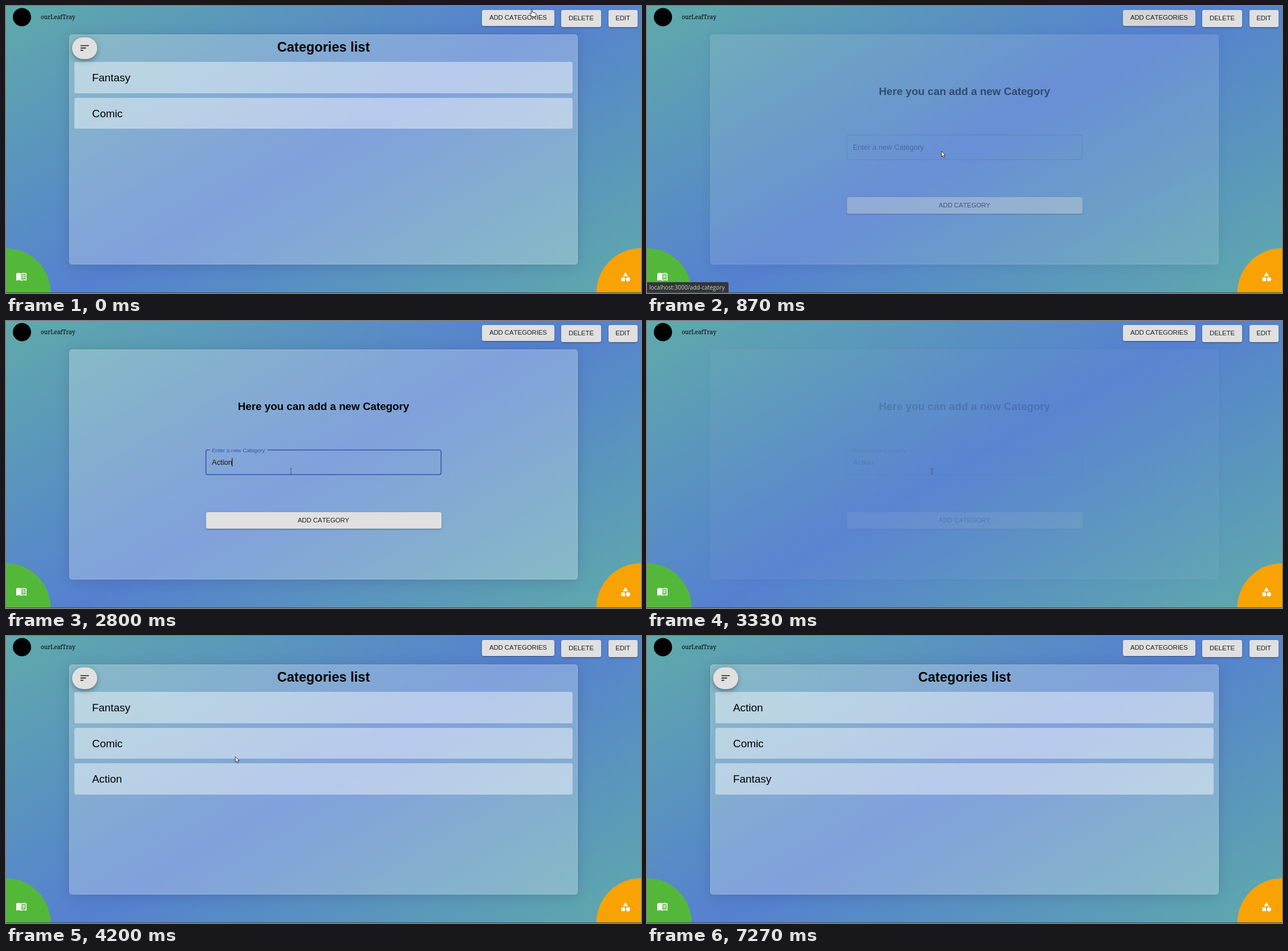
These frames come from a looping animation (1114x503 px, 7390 ms). An HTML page:

```html
<!DOCTYPE html>
<html lang="en">
<head>
<meta charset="utf-8">
<title>Categories</title>
<style>
html, body { margin: 0; width: 100%; height: 100%; overflow: hidden; }
#stage {
  position: relative; width: 1114px; height: 503px; overflow: hidden;
  background: linear-gradient(150deg, #5faaaa, #5580d0 50%, #5faaaa);
  font-family: "Liberation Sans", Arial, sans-serif;
}
#stage div, svg { position: absolute; box-sizing: border-box; }
svg { left: 0; top: 0; width: 1114px; height: 503px; }
text { font-kerning: none; white-space: pre; }
.screen { left: 0; top: 0; width: 1114px; height: 503px; }
.panel {
  left: 111px; top: 50px; width: 892px; height: 403px; border-radius: 5px;
  background: rgba(255,255,255,.26); border: 1px solid rgba(255,255,255,.18);
  box-shadow: 0 3px 24px rgba(0,0,0,.12);
}
.row { left: 120px; width: 874px; height: 54.5px; border-radius: 3.3px; background: rgba(255,255,255,.43); }
.btn {
  border-radius: 3.3px; background: #e0e0e0;
  box-shadow: 0 2.4px .8px -1.6px rgba(0,0,0,.2), 0 1.6px 1.6px rgba(0,0,0,.14), 0 .8px 4px rgba(0,0,0,.12);
}
.head { top: 6.5px; height: 30px; }
#sort {
  left: 116px; top: 55px; width: 44px; height: 37.5px; border-radius: 19px;
  box-shadow: 0 2.4px 4px -.8px rgba(0,0,0,.2), 0 5px 8px rgba(0,0,0,.14), 0 .8px 14px rgba(0,0,0,.12);
}
.caps { font-size: 11.42px; letter-spacing: -.08px; fill: rgba(0,0,0,.87); text-anchor: middle; }
.title { font-weight: bold; text-anchor: middle; }
.item { font-size: 18.9px; }
.field { font-size: 13.05px; letter-spacing: -.07px; }
#tip { left: 125px; top: 103px; width: 26px; height: 17px; border-radius: 3.3px; background: rgba(97,97,97,.9); }
#tip span { display: block; font: 500 8.15px/17px Roboto, sans-serif; color: #fff; text-align: center; }
#status {
  left: 0; top: 484px; width: 143px; height: 19px; background: #343639; border-radius: 0 3px 0 0;
  font: 10px/19px "Open Sans", sans-serif; color: #c9cbcd; padding-left: 4px; white-space: nowrap;
}
</style>
</head>
<body>
<div id="stage">
  <div class="btn head" id="add" style="left:835px;width:127px;height:28.5px"></div>
  <div class="btn head" style="left:974px;width:70px"></div>
  <div class="btn head" style="left:1056.5px;width:51.5px"></div>
  <svg>
    <circle cy="503" r="78.4" fill="#53b83a"/>
    <circle cx="1114" cy="503" r="78.4" fill="#f9a203"/>
    <circle cx="28" cy="19.5" r="16"/>
    <text x="61" y="22.5" font-size="10.1" font-family="Noto Serif, serif">ourLeafTray</text>
    <text class="caps" x="898.4" y="24.4">ADD CATEGORIES</text>
    <text class="caps" x="1009" y="25">DELETE</text>
    <text class="caps" x="1082" y="25">EDIT</text>
    <g transform="translate(17.2 464.2) scale(.8155)" fill="#fff">
      <path fill-rule="evenodd" d="M12 6C10.5 4.9 8.5 4.5 6.5 4.5S2.5 4.9 1 6v15.2C2.5 20.4 4.6 20 6.5 20s4 .4 5.5 1.5C13.5 20.5 15.8 20 17.5 20s3.8.4 5.5 1.2V6c-1.6-1.1-3.5-1.5-5.5-1.5S13.5 4.9 12 6zm9 12.5c-3-.9-6.5-.6-9 1V8c2.5-1.6 6-1.9 9-1z"/>
      <path d="M13.5 10.3q3-1.2 6-.6M13.5 13q3-1.2 6-.6M13.5 15.7q3-1.2 6-.6" fill="none" stroke="#fff" stroke-width="1.5"/>
    </g>
    <g transform="translate(1077 464.7) scale(.8155)" fill="#fff">
      <path d="M12 2l-5.5 9h11zM3 13.5h8v8H3z"/>
      <circle cx="17.5" cy="17.5" r="4.5"/>
    </g>
  </svg>

  <div class="screen" id="list">
    <div class="panel"></div>
    <div class="row" style="top:98px"></div>
    <div class="row" style="top:160.7px"></div>
    <div class="row" id="third" style="top:223.3px"></div>
    <div id="sort"></div>
    <svg>
      <path transform="translate(128.2 63.8) scale(.8155)" d="M3 18h6v-2H3zM3 6v2h18V6zM3 13h12v-2H3z" fill-opacity=".87"/>
      <text class="title" x="557" y="80" font-size="23.6">Categories list</text>
      <text class="item" x="151" y="131.8"></text>
      <text class="item" x="151" y="194.5"></text>
      <text class="item" x="151" y="256.9"></text>
    </svg>
    <div id="tip"><span>Sort</span></div>
  </div>

  <div class="screen" id="form">
    <div class="panel"></div>
    <div class="btn" style="left:350.5px;top:335px;width:413px;height:29px"></div>
    <svg>
      <text class="title" x="557" y="156" font-size="18.8">Here you can add a new Category</text>
      <path id="outline" fill="none"/>
      <text class="field" id="label">Enter a new Category</text>
      <text class="field" id="typed" x="361" y="252" fill-opacity=".87"></text>
      <rect id="caret" y="240" width="1" height="15"/>
      <text class="caps" x="557" y="353">ADD CATEGORY</text>
    </svg>
  </div>

  <div id="status">localhost:3000/add-category</div>
  <svg>
    <rect y="502" width="1114" height="1" fill="#35505c"/>
    <g id="pointer">
      <path data-kind="arrow" d="M0 0v9.5l2.2-2 1.6 3.6 1.7-.7L4 6.9h3z" fill="#fff" stroke="#111" stroke-width=".8"/>
      <path data-kind="hand" d="M0 1c0-1.5 2-1.5 2 0v4.2l5 1c1.2.3 1.6 1 1.5 2l-.7 4.3H1.5L-2.6 8c-.6-.8.4-2 1.4-1.3L0 8z" fill="#fff" stroke="#222" stroke-width=".9"/>
      <path data-kind="beam" d="M-2-4.5h1.5l.5.5.5-.5H2M0-4v8.5M-2 5h1.5l.5-.5.5.5H2" fill="none" stroke="#4a5560" stroke-width=".9"/>
    </g>
  </svg>
</div>
<script>
const LOOP = 7390, TICK = 1000 / 15;
const WORD = 'Action';
const $ = id => document.getElementById(id);
const items = [...document.querySelectorAll('.item')];
const kinds = [...document.querySelectorAll('[data-kind]')];

const ramp = (t, start, span) => Math.min(1, Math.max(0, (t - start) / span));
const easeOut = x => 1 - (1 - x) ** 2;
const easeInOut = x => x * x * (3 - 2 * x);
const fadeIn = (t, start) => easeOut(ramp(t, start, 350));
const fadeOut = (t, start) => 1 - easeOut(ramp(t, start, 200));
const pulse = (t, on, off) => ramp(t, on, 200) - ramp(t, off, 200);
const grey = v => `rgb(${v},${v},${v})`;
const show = (el, on) => el.style.display = on ? '' : 'none';

// Pointer trips: start, duration, destination.
const home = [921.5, 6];
const trips = [
  { at: 0, span: 200, to: [918, 16] },
  { at: 600, span: 270, to: [516.5, 254.5] },
  { at: 930, span: 300, to: [500, 263] },
  { at: 3930, span: 800, to: [131, 68.5] },
  { at: 5930, span: 800, to: [102, 420] },
  { at: 6730, span: 540, to: [24, 508] }
];

function pointerAt(t) {
  return trips.reduce((p, { at, span, to }) => {
    const k = easeInOut(ramp(t, at, span));
    return p.map((v, i) => v + (to[i] - v) * k);
  }, home);
}

function pointerKind(t, x, y) {
  const onSort = Math.hypot(x - 138, y - 73) < 22;
  const onCorner = Math.hypot(x, y - 503) < 78;
  if (y < 37 || onSort || onCorner) return 'hand';
  return t > 1250 && y > 226 && y < 270 && x > 350 ? 'beam' : 'arrow';
}

function drawPointer(t) {
  const [x, y] = pointerAt(t), kind = pointerKind(t, x, y);
  kinds.forEach(el => show(el, el.dataset.kind === kind));
  $('pointer').setAttribute('transform', `translate(${x} ${y})`);
}

// The letters come faster towards the end of the word.
function typedAt(t) {
  if (t < 2000) return '';
  return WORD.slice(0, 1 + Math.floor((WORD.length - 1) * ramp(t, 2000, 800) ** 1.5));
}

function drawField(t) {
  const lift = easeInOut(ramp(t, 1270, 200));
  const focused = t >= 1270 && t < 3250;
  const tint = focused ? lift : 0;
  const outline = $('outline');
  outline.setAttribute('d', `M${358 + 101 * lift} 226H760a3.3 3.3 0 0 1 3.3 3.3V266a3.3 3.3 0 0 1-3.3 3.3H354
    a3.3 3.3 0 0 1-3.3-3.3V229.3a3.3 3.3 0 0 1 3.3-3.3H358`);
  outline.setAttribute('stroke', focused ? '#3f51b5' : 'rgba(0,0,0,.23)');
  outline.setAttribute('stroke-width', focused ? 1.6 : .9);
  $('label').setAttribute('transform', `translate(361 ${252 - 22.5 * lift}) scale(${1 - .25 * lift})`);
  $('label').setAttribute('fill', `rgba(${63 * tint},${81 * tint},${181 * tint},${.54 + .46 * tint})`);
  $('typed').textContent = typedAt(t);
  $('caret').setAttribute('x', 360.5 + (t < 2000 ? 0 : $('typed').getComputedTextLength()));
  show($('caret'), focused && t >= 1800);
}

function drawList(t) {
  const names = ['Fantasy', 'Comic'];
  if (t > 1500) names.push(WORD);
  if (t > 5060) names.sort();
  items.forEach((el, i) => el.textContent = names[i] || '');
  show($('third'), names.length > 2);
  $('sort').style.background = grey(224 - 11 * pulse(t, 4600, 6070) - 28 * pulse(t, 4970, 6070));
  $('tip').style.opacity = pulse(t, 4800, 6070);
}

function draw() {
  const step = Math.floor((performance.now() % LOOP + 4) / TICK);
  const t = Math.round(step * TICK / 10) * 10;
  $('list').style.opacity = fadeOut(t, 400) + fadeIn(t, 3395);
  $('form').style.opacity = fadeIn(t, 780) * fadeOut(t, 3200);
  $('add').style.background = grey(224 - 11 * pulse(t, 0, 900));
  show($('status'), t > 120 && t < 990);
  drawList(t);
  drawField(t);
  drawPointer(t);
  requestAnimationFrame(draw);
}
draw();
</script>
</body>
</html>
```
